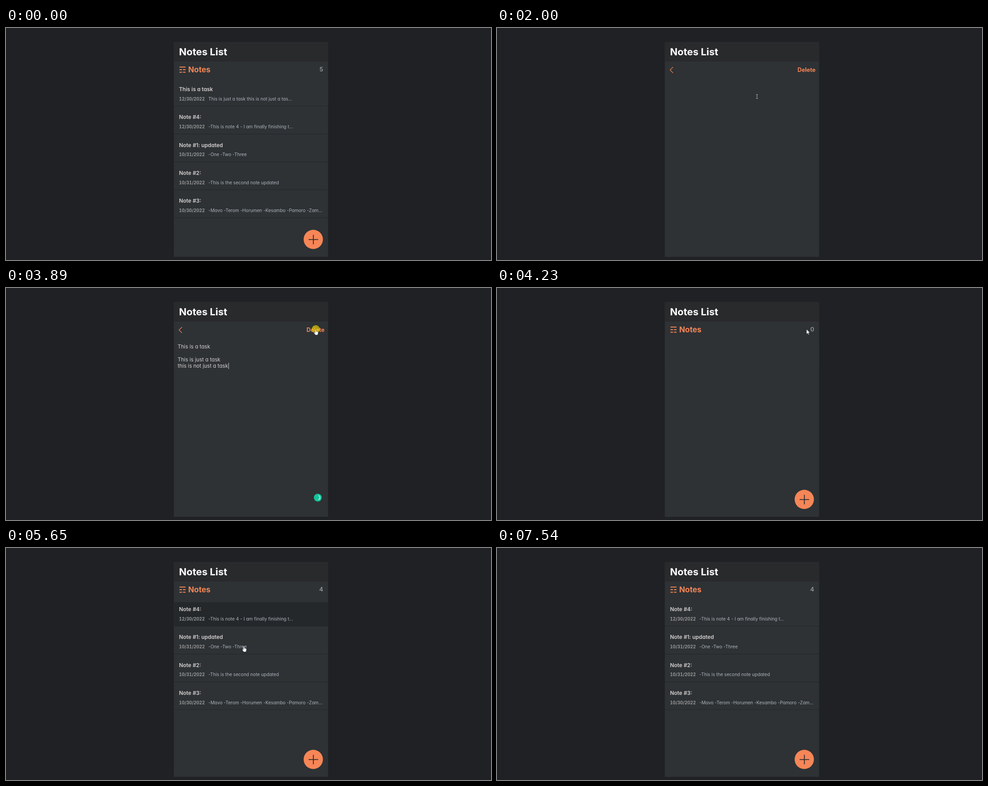
An HTML page that plays this animation: 1082x518 px, repeating every 8 s.

```html
<!DOCTYPE html>
<html lang="en">
<head>
<meta charset="utf-8">
<title>Notes List</title>
<style>
html, body { margin: 0; width: 100%; height: 100%; overflow: hidden; background: #1f2124; }
svg { display: block; width: 1082px; height: 518px; }
text { font-family: Inter, "Open Sans", sans-serif; font-feature-settings: "cv11"; white-space: pre; }

.main { fill: #f68657; font-weight: 650; }
.title { fill: #d6d1d1; font-size: 11.9px; font-weight: 620; }
.date { fill: #999; font-size: 9.7px; font-weight: 650; font-feature-settings: "tnum"; }
.body { fill: #acb4bd; font-size: 10.1px; font-weight: 440; }
.count { fill: #999; font-size: 13px; font-weight: 600; text-anchor: end; }
.note { fill: #d6d1d1; font-size: 11.6px; }
.line { stroke: #252629; }

/* One shared 8 s timeline; most parts switch hard. */
.t { animation: 8s step-end infinite; }
.list { animation-name: list; }
.editor { animation-name: editor; }
.first { animation-name: first; }
.rest { animation-name: rest; }
.hover { animation-name: hover; }
.five { animation-name: first; }
.zero { animation-name: zero; }
.four { animation-name: four; }
.words { animation-name: words; }
.caret { animation-name: caret; }
.badge { animation-name: badge; }
.spin { animation: spin 8s linear infinite; }
.click1 { animation-name: click1; }
.click2 { animation-name: click2; }
.cursor { animation: move 8s linear infinite; }
.arrow { animation-name: arrow; }
.hand { animation-name: hand; }
.beam { animation-name: beam; }

@keyframes list { 0%, 52.875% { opacity: 1 } 25% { opacity: 0 } }
@keyframes editor { 0%, 52.875% { opacity: 0 } 25% { opacity: 1 } }
@keyframes first { 0% { opacity: 1 } 25%, 100% { opacity: 0 } }
@keyframes rest {
  0% { opacity: 1; transform: none }
  25% { opacity: 0; transform: none }
  54.625%, 100% { opacity: 1; transform: translateY(-62.2px) }
}
@keyframes hover {
  0%, 25%, 73.75%, 100% { fill: #2e3235 }
  12.25% { fill: #1f2124 }
  58.875% { fill: #232327 }
  62.5% { fill: #24282a }
}
@keyframes zero { 0%, 54.625%, 100% { opacity: 0 } 52.875% { opacity: 1 } }
@keyframes four { 0% { opacity: 0 } 54.625%, 100% { opacity: 1 } }
@keyframes words { 0% { opacity: 0 } 27.5%, 100% { opacity: 1 } }
@keyframes caret { 0%, 36.625%, 49.875%, 100% { opacity: 0 } 30%, 43.25% { opacity: 1 } }
@keyframes badge { 0% { opacity: 0 } 30%, 100% { opacity: 1 } }
@keyframes spin { to { transform: rotate(2880deg) } }
@keyframes click1 { 0%, 23.375%, 100% { opacity: 0 } 20.875% { opacity: 1 } }
@keyframes click2 { 0%, 51.25%, 100% { opacity: 0 } 48.6% { opacity: 1 } }
@keyframes arrow {
  0%, 12.25%, 41.125%, 58.875%, 94.2%, 100% { opacity: 0 }
  3.875%, 37.75%, 52.875%, 76.5% { opacity: 1 }
}
@keyframes hand {
  0%, 25%, 52.875%, 76.5%, 100% { opacity: 0 }
  12.25%, 41.125%, 58.875% { opacity: 1 }
}
@keyframes beam { 0%, 37.75%, 100% { opacity: 0 } 25% { opacity: 1 } }
@keyframes move {
  0% { transform: translate(1053px, 530px); animation-timing-function: step-end }
  3.875% { transform: translate(1050px, 508px); animation-timing-function: steps(4) }
  7.25% { transform: translate(738px, 104px); animation-timing-function: step-end }
  11.375% { transform: translate(715px, 110px); animation-timing-function: steps(6) }
  16.475% { transform: translate(580px, 153px); animation-timing-function: step-end }
  28.375% { transform: translate(583px, 150px); animation-timing-function: steps(7) }
  34.225% { transform: translate(614.5px, 128.5px); animation-timing-function: steps(3) }
  36.875% { transform: translate(640px, 110px); animation-timing-function: step-end }
  37.75% { transform: translate(646px, 107px); animation-timing-function: steps(6) }
  43% { transform: translate(690.5px, 92px); animation-timing-function: step-end }
  58% { transform: translate(676px, 110px); animation-timing-function: steps(3) }
  60.85% { transform: translate(622.5px, 189px); animation-timing-function: steps(8) }
  67.875% { transform: translate(530.5px, 219px); animation-timing-function: step-end }
  71.5% { transform: translate(532px, 238px); animation-timing-function: steps(7) }
  77.375% { transform: translate(553px, 383px); animation-timing-function: step-end }
  81.375% { transform: translate(600px, 391px); animation-timing-function: steps(6) }
  86.75% { transform: translate(1018px, 465px); animation-timing-function: step-end }
  90.875% { transform: translate(1022px, 472px); animation-timing-function: steps(4) }
  94.25%, 100% { transform: translate(1053px, 530px) }
}
</style>
</head>
<body>
<svg viewBox="0 0 1082 518">
  <rect x="374.5" y="31" width="344" height="480" fill="#2e3235"/>
  <rect x="374.5" y="31" width="344" height="44" fill="#292a2c"/>
  <text x="386" y="61" font-size="22" font-weight="720" fill="#fff">Notes List</text>

  <g class="t list">
    <path d="M387 87.3h13.5M387 93h5.7m2.1 0h5.7M387 98.7h5.7m2.1 0h5.7" stroke="#f68657" stroke-width="2"/>
    <text class="main" x="406.5" y="99" font-size="17.2">Notes</text>
    <text class="count t five" x="707.5" y="97">5</text>
    <text class="count t zero" x="707.5" y="97">0</text>
    <text class="count t four" x="707.5" y="97">4</text>
    <rect class="t hover" x="374.5" y="121" width="344" height="53.5" fill="#2e3235"/>
    <g id="first" class="t first"></g>
    <g id="rest" class="t rest"></g>
    <circle cx="685.5" cy="472" r="21.5" fill="#f68657"/>
    <path d="M675 472.4h21.4M685.7 461.7v21.4" stroke="#292a2c" stroke-width="1.8"/>
  </g>

  <g class="t editor">
    <path d="M392.7 87.2l-6.7 6.5 6.7 6.5" fill="none" stroke="#f68657" stroke-width="1.2"/>
    <text class="main" x="670.5" y="98.3" font-size="12.8">Delete</text>
    <g class="t words note">
      <text x="383" y="135.2">This is a task</text>
      <text x="383" y="164">This is just a task</text>
      <text x="383" y="178.3">this is not just a task</text>
    </g>
    <path class="t caret" d="M496.7 167v14" stroke="#d6d1d1"/>
    <g class="t badge">
      <circle cx="695.6" cy="468" r="8.8" fill="#15c39a"/>
      <g transform="translate(695.6 468)">
        <g class="spin">
          <circle r="4.7" pathLength="360" stroke-dasharray="150 210" transform="rotate(-35)"
            fill="none" stroke="#e8fff8" stroke-width="1.4"/>
        </g>
      </g>
    </g>
  </g>

  <g fill="#ffe600" fill-opacity=".6">
    <circle class="t click1" cx="580" cy="153" r="9"/>
    <circle class="t click2" cx="691" cy="92" r="9"/>
  </g>

  <g class="cursor">
    <path class="t arrow" d="M0 0v11l2.5-2.3 1.7 3.8 1.7-.8-1.7-3.6h3.4z" fill="#fff" stroke="#000" stroke-width=".5"/>
    <path class="t hand" d="M-1.2 1.2a1.2 1.2 0 0 1 2.4 0v3.6l3.6.8q1.5.4 1.3 2l-.6 3.2-.9 2.2h-4.8l-3.2-4.6q-.5-1.3.7-1.4l1.5 1.1z" fill="#fff" stroke="#000" stroke-width=".5"/>
    <path class="t beam" d="M-2-4.5h1.4l.6.6.6-.6h1.4M0-4v8M-2 4.5h1.4l.6-.6.6.6h1.4" fill="none" stroke="#c8c8c8" stroke-width=".9"/>
  </g>
</svg>
<script>
const notes = [
  ["This is a task", "12/30/2022", "This is just a task this is not just a tas..."],
  ["Note #4:", "12/30/2022", "-This is note 4 - I am finally finishing t..."],
  ["Note #1: updated", "10/31/2022", "-One -Two -Three"],
  ["Note #2:", "10/31/2022", "-This is the second note updated"],
  ["Note #3:", "10/30/2022", "-Mavo -Terom -Horumen -Kesambo -Pamoro -Zam..."]
];
const row = ([title, date, body], i) => {
  const y = 62.2 * i;
  return `<text class="title" x="386" y="${141.2 + y}">${title}</text>
    <text class="date" x="386" y="${162 + y}">${date}</text>
    <text class="body" x="451.5" y="${162 + y}">${body}</text>
    <path class="line" d="M374.5 ${174.5 + y}h344"/>`;
};
const rows = notes.map(row);
document.getElementById("first").innerHTML = rows[0];
document.getElementById("rest").innerHTML = rows.slice(1).join("");
</script>
</body>
</html>
```
